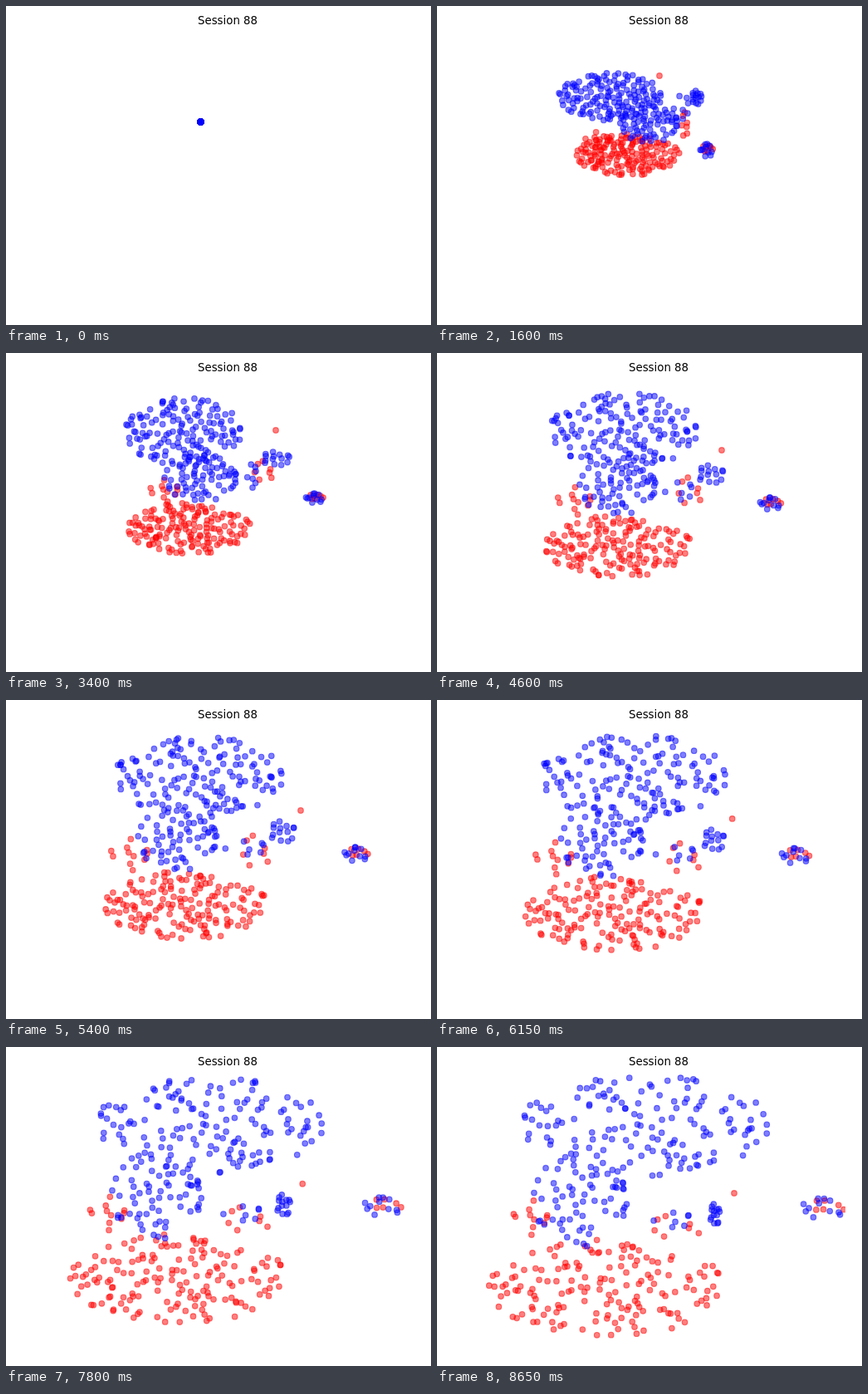
An HTML page with a canvas for the animation above (8700 ms loop, 512 px wide and 384 px high).

```html
<!DOCTYPE html>
<html lang="en">
<head>
<meta charset="utf-8">
<title>Session 88</title>
<style>
  html, body { margin: 0; width: 100%; height: 100%; overflow: hidden; background: #fff; }
  canvas { display: block; }
</style>
</head>
<body>
<canvas id="stage" width="512" height="384"></canvas>
<script>
const ctx = document.getElementById('stage').getContext('2d');
const LOOP = 8700, STEP = 50, START = [234.5, 139.5];
const TIMES = [1600, 3400, 5400, 8650];
const RED = '#f00', BLUE = '#00f';

// Each cluster is an ellipse [cx, cy, rx, ry] at every one of TIMES.
const clusters = [
  { n: 158, color: () => RED, keys: [[230, 179, 62, 25], [221, 211, 74, 31], [217, 247, 98, 41], [205, 290, 143, 58]] },
  { n: 11, color: () => RED, keys: [[192, 163, 15, 12], [190, 166, 18, 14], [148, 186, 24, 20], [112, 205, 22, 22]] },
  { n: 7, color: () => RED, keys: [[300, 143, 6, 16], [315, 142, 18, 13], [307, 182, 25, 21], [297, 216, 43, 15]] },
  { n: 1, color: () => RED, keys: [[268, 84, 0, 0], [325, 93, 0, 0], [355, 133, 0, 0], [358, 176, 0, 0]] },
  { n: 17, color: i => i % 3 ? BLUE : RED, keys: [[325, 174, 8, 8], [372, 175, 11, 6], [422, 186, 15, 9], [465, 195, 27, 13]] },
  { n: 145, color: () => BLUE, keys: [[209, 109, 63, 29], [214, 95, 71, 42], [233, 92, 103, 49], [251, 94, 152, 61]] },
  { n: 62, color: () => BLUE, keys: [[255, 141, 35, 24], [234, 151, 44, 28], [206, 167, 48, 39], [172, 184, 57, 57]] },
  { n: 7, color: () => BLUE, keys: [[294, 122, 10, 18], [296, 148, 6, 18], [288, 178, 27, 10], [283, 208, 25, 11]] },
  { n: 14, color: () => BLUE, keys: [[312, 111, 7, 9], [323, 128, 20, 9], [331, 160, 18, 14], [334, 203, 7, 14]] }
];

let seed = 88;
function rand() {
  seed = (seed * 1664525 + 1013904223) >>> 0;
  return seed / 4294967296;
}

const lerp = (a, b, k) => a + (b - a) * k;
const spot = () => ({ r: rand() ** 0.55, a: rand() * Math.PI * 2, spin: rand() - 0.5 });
const place = (p, turn = 0) => {
  const a = p.a + p.spin * turn;
  return [p.r * Math.cos(a), p.r * Math.sin(a)];
};

// Best of a few candidates keeps the points loosely spaced.
function scatter(n) {
  const points = [];
  while (points.length < n) {
    let best, bestGap = -1;
    for (let c = 0; c < 4; c++) {
      const p = spot(), [x, y] = place(p);
      const gap = Math.min(9, ...points.map(q => {
        const [u, v] = place(q);
        return Math.hypot(x - u, y - v);
      }));
      if (gap > bestGap) [best, bestGap] = [p, gap];
    }
    points.push(best);
  }
  return points;
}

const dots = clusters.flatMap(c =>
  scatter(c.n).map((p, i) => ({ p, color: c.color(i), cluster: c })))
  .sort((a, b) => (a.color === BLUE) - (b.color === BLUE));

function shapeAt(keys, t) {
  if (t <= TIMES[0]) return keys[0];
  let i = 0;
  while (i < TIMES.length - 2 && t > TIMES[i + 1]) i++;
  const k = (t - TIMES[i]) / (TIMES[i + 1] - TIMES[i]);
  return keys[i].map((v, j) => lerp(v, keys[i + 1][j], k));
}

function draw(t) {
  const grow = 1 - Math.max(0, 1 - t / TIMES[0]) ** 2.2;
  ctx.fillStyle = '#fff';
  ctx.fillRect(0, 0, 512, 384);
  ctx.fillStyle = '#000';
  ctx.font = '13.333px "DejaVu Sans", sans-serif';
  ctx.textAlign = 'center';
  ctx.fillText('Session 88', 267, 22);

  for (const c of clusters) c.shape = shapeAt(c.keys, t);
  ctx.save();
  ctx.beginPath();
  ctx.rect(41, 29, 451, 327);
  ctx.clip();
  ctx.globalAlpha = 0.5;
  ctx.lineWidth = 1.1;
  for (const { p, color, cluster } of dots) {
    const [cx, cy, rx, ry] = cluster.shape, [u, v] = place(p, t / LOOP);
    ctx.beginPath();
    ctx.arc(lerp(START[0], cx + rx * u, grow), lerp(START[1], cy + ry * v, grow), 3.33, 0, Math.PI * 2);
    ctx.fillStyle = ctx.strokeStyle = color;
    ctx.fill();
    ctx.stroke();
  }
  ctx.restore();
}

function tick() {
  const t = performance.now() % LOOP;
  draw(Math.floor(t / STEP) * STEP);
  requestAnimationFrame(tick);
}
tick();
</script>
</body>
</html>
```
